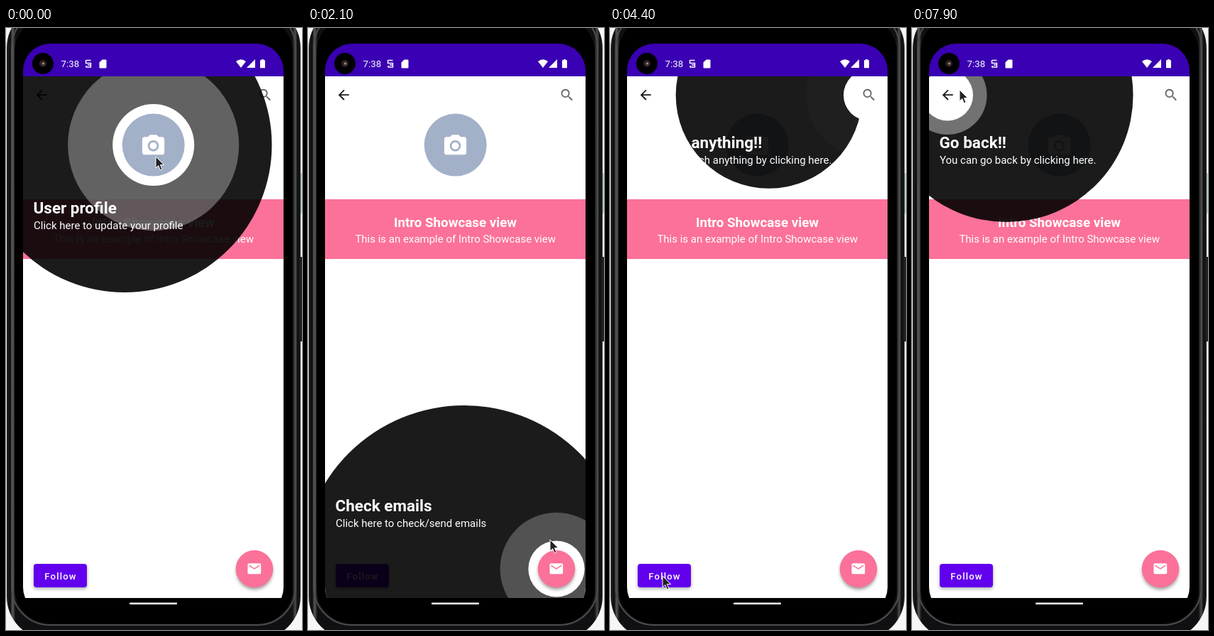
Recreate the animation shown at these times as an HTML page. Size 417 px wide and 847 px high, loop 8000 ms.

```html
<!DOCTYPE html>
<html lang="en">
<head>
<meta charset="utf-8">
<title>Intro showcase</title>
<style>
  html, body { margin: 0; width: 100%; height: 100%; overflow: hidden; background: #f6f6f6; }
  svg { display: block; font-family: Roboto, sans-serif; }
  .title { font-size: 22.5px; font-weight: 700; }
  .body { font-size: 15px; }
</style>
</head>
<body>
<svg width="417" height="847" viewBox="0 0 417 847">
  <defs>
    <linearGradient id="rim">
      <stop offset="0" stop-color="#222"/>
      <stop offset=".012" stop-color="#0c0c0e"/>
      <stop offset=".02" stop-color="#5a5a5c"/>
      <stop offset=".03" stop-color="#101012"/>
      <stop offset=".972" stop-color="#101012"/>
      <stop offset=".982" stop-color="#4a4a4c"/>
      <stop offset=".99" stop-color="#0c0c0e"/>
      <stop offset="1" stop-color="#222"/>
    </linearGradient>
    <filter id="soft" x="-50%" y="-50%" width="200%" height="200%"><feGaussianBlur stdDeviation="2.5"/></filter>
    <clipPath id="screen"><rect x="24" y="22" width="367" height="803" rx="38"/></clipPath>
    <clipPath id="page"><rect x="24" y="68" width="367" height="734"/></clipPath>
    <mask id="spot" maskUnits="userSpaceOnUse" x="0" y="0" width="417" height="847">
      <rect width="417" height="847" fill="#fff"/>
      <circle id="hole"/>
    </mask>
  </defs>

  <!-- Phone body -->
  <rect x="412" y="204" width="6" height="57" rx="2" fill="#b4cbc6"/>
  <rect x="412" y="322" width="6" height="119" rx="2" fill="#222"/>
  <rect x="1" y="-32" width="414" height="892" rx="60" fill="url(#rim)"/>
  <rect x="8" y="-26" width="400" height="866" rx="54" fill="none" stroke="#4c4c4e" stroke-width="2"/>
  <rect x="12" y="-16" width="392" height="854" rx="50"/>

  <!-- App -->
  <g clip-path="url(#screen)">
    <rect x="24" y="22" width="367" height="46" fill="#3a00b3"/>
    <rect x="24" y="68" width="367" height="734" fill="#fff"/>
    <rect x="24" y="241" width="367" height="84" fill="#fb7199"/>
    <path transform="translate(39 82.9) scale(.9375)" fill="#1c1c1c" d="M20 11H7.83l5.59-5.59L12 4l-8 8 8 8 1.41-1.41L7.83 13H20v-2z"/>
    <path transform="translate(353.7 83) scale(.9375)" fill="#666" d="M15.5 14h-.79l-.28-.27A6.47 6.47 0 0 0 16 9.5 6.5 6.5 0 1 0 9.5 16c1.61 0 3.09-.59 4.23-1.57l.27.28v.79l5 4.99L20.49 19l-4.99-5zm-6 0C7.01 14 5 11.99 5 9.5S7.01 5 9.5 5 14 7.01 14 9.5 11.99 14 9.5 14z"/>
    <circle cx="207.7" cy="164.6" r="44" fill="#a2b0c8"/>
    <g transform="translate(188.8 147) scale(1.5625)" fill="#fff">
      <path d="M9 2L7.17 4H4c-1.1 0-2 .9-2 2v12c0 1.1.9 2 2 2h16c1.1 0 2-.9 2-2V6c0-1.1-.9-2-2-2h-3.17L15 2H9zm3 15c-2.76 0-5-2.24-5-5s2.24-5 5-5 5 2.24 5 5-2.24 5-5 5z"/>
      <circle cx="12" cy="12" r="3.2"/>
    </g>
    <g fill="#fff" text-anchor="middle">
      <text x="207.5" y="280" font-size="18.75" font-weight="700">Intro Showcase view</text>
      <text x="207.7" y="302" class="body">This is an example of Intro Showcase view</text>
    </g>
    <rect x="39" y="756" width="75" height="33" rx="4" opacity=".35" filter="url(#soft)"/>
    <rect x="39" y="754" width="75" height="33" rx="4" fill="#6200ee"/>
    <text x="54.3" y="775.6" fill="#fff" font-size="13.125" font-weight="500" letter-spacing="1.17">Follow</text>
    <circle cx="350" cy="764.5" r="25.5" opacity=".4" filter="url(#soft)"/>
    <circle cx="350" cy="761" r="26.3" fill="#fb7199"/>
    <path transform="translate(338.6 749.6) scale(.9375)" fill="#fff" d="M20 4H4c-1.1 0-1.99.9-1.99 2L2 18c0 1.1.9 2 2 2h16c1.1 0 2-.9 2-2V6c0-1.1-.9-2-2-2zm0 4l-8 5-8-5V6l8 5 8-5v2z"/>

    <g clip-path="url(#page)">
      <g mask="url(#spot)">
        <circle id="outer" fill-opacity=".893"/>
        <circle class="ring" fill="#fff"/>
        <circle class="ring" fill="#fff"/>
      </g>
      <text id="head" class="title" x="38.5" fill="#fff"></text>
      <text id="note" class="body" x="39" fill="#fff"></text>
    </g>
  </g>

  <!-- Status and navigation bars -->
  <circle cx="52" cy="50" r="15"/>
  <circle cx="52" cy="50" r="5" fill="#2a2224"/>
  <circle cx="52.5" cy="50" r="1.8" fill="#a48478"/>
  <g fill="#fff">
    <text x="77.5" y="55" font-size="13.3">7:38</text>
    <path d="M113 45.5h6.5M112.5 45v4.5h7v5.5h-6.5v-2M115 52h4" fill="none" stroke="#fff" stroke-width="1.4"/>
    <path d="M131.5 48.5l4-4h5q1 0 1 1v10q0 1-1 1h-8q-1 0-1-1z"/>
    <path d="M324 47q7-5.500 14 0l-7 9z"/>
    <path d="M351 44v12h-12z"/>
    <path d="M360 44h3v1.300h2v11h-7v-11h2z"/>
    <rect x="174" y="808.500" width="67" height="2.500" rx="1"/>
  </g>

  <path id="cursor" d="M0 0V16L3.700 12.600L6.300 18.800L9 17.600L6.400 11.600H11.500Z" fill="#222" stroke="#fff"/>
</svg>
<script>
const LOOP = 8000, STEP = 100, GROW = 500, PULSE = 2000, PHASE = 0.79;

// Steps at which the picture stands still
const held = new Set([25, 26, 27, 28, 29, 33, 39, 42, 45, 64]);

// spot and outer are [cx, cy, r]; size scales the pulse; y is the heading baseline
const scenes = [
  { start: -1000, spot: [207.7, 164.6, 57.5], outer: [167, 164.6, 207.5], size: 88, y: 261,
    head: "User profile", note: "Click here to update your profile" },
  { start: 610, spot: [350, 761, 39.6], outer: [220, 761, 230], size: 52.5, y: 680,
    head: "Check emails", note: "Click here to check/send emails" },
  { start: 2950, spot: [76.5, 770.5, 51.5], outer: [83.5, 770.5, 160], size: 75, y: 678,
    head: "Follow me", note: "Click here to follow" },
  { start: 4210, spot: [365, 94.5, 36], outer: [224, 94.5, 230], size: 45, y: 169,
    head: "Search anything!!", note: "You can search anything by clicking here." },
  { start: 6303, spot: [50, 94.5, 36], outer: [133, 94.5, 178.500], size: 45, y: 169,
    head: "Go back!!", note: "You can go back by clicking here." }
];

// Pointer path: [time, x, y]
const path = [
  [0, 211, 181], [1300, 211, 181], [1800, 308, 585], [2000, 341, 720], [2200, 341, 720],
  [2400, 350, 750], [3200, 350, 750], [3400, 258, 738], [3700, 74, 771], [4500, 74, 771],
  [5200, 358, 137], [5700, 358, 137], [6000, 365, 108], [6500, 365, 108],
  [7200, 67, 87], [8000, 67, 87]
];

const $ = id => document.getElementById(id);
const hole = $("hole"), outer = $("outer"), head = $("head"), note = $("note"), cursor = $("cursor");
const rings = document.querySelectorAll(".ring");

// cubic-bezier(.4, 0, x2, 1)
function ease(x, x2) {
  let lo = 0, hi = 1;
  for (let i = 0; i < 24; i++) {
    const s = (lo + hi) / 2, r = 1 - s;
    if (1.2 * s * r * r + 3 * x2 * s * s * r + s ** 3 < x) lo = s; else hi = s;
  }
  return lo * lo * (3 - 2 * lo);
}

function setCircle(el, [cx, cy], r) {
  el.setAttribute("cx", cx);
  el.setAttribute("cy", cy);
  el.setAttribute("r", r);
}

function setText(el, text, y) {
  el.textContent = text;
  el.setAttribute("y", y);
}

function draw(t) {
  const scene = scenes.findLast(s => s.start <= t);
  const grown = ease(Math.min(1, (t - scene.start) / GROW), 0.2);
  setCircle(outer, scene.outer, scene.outer[2] * grown);
  setCircle(hole, scene.spot, scene.spot[2]);
  rings.forEach((ring, i) => {
    const v = ease((t / PULSE + PHASE + i / 2) % 1, 1);
    setCircle(ring, scene.spot, 2 * scene.size * v);
    ring.setAttribute("fill-opacity", 1 - v);
  });
  setText(head, scene.head, scene.y);
  setText(note, scene.note, scene.y + 22);

  const i = path.findIndex(p => p[0] > t);
  const [t0, x0, y0] = path[i - 1], [t1, x1, y1] = path[i];
  const k = (t - t0) / (t1 - t0);
  cursor.setAttribute("transform", `translate(${x0 + (x1 - x0) * k} ${y0 + (y1 - y0) * k})`);
}

const begin = performance.now();
function tick() {
  let n = Math.floor((performance.now() - begin) % LOOP / STEP);
  while (held.has(n)) n--;
  draw(n * STEP);
  requestAnimationFrame(tick);
}
tick();
</script>
</body>
</html>
```
